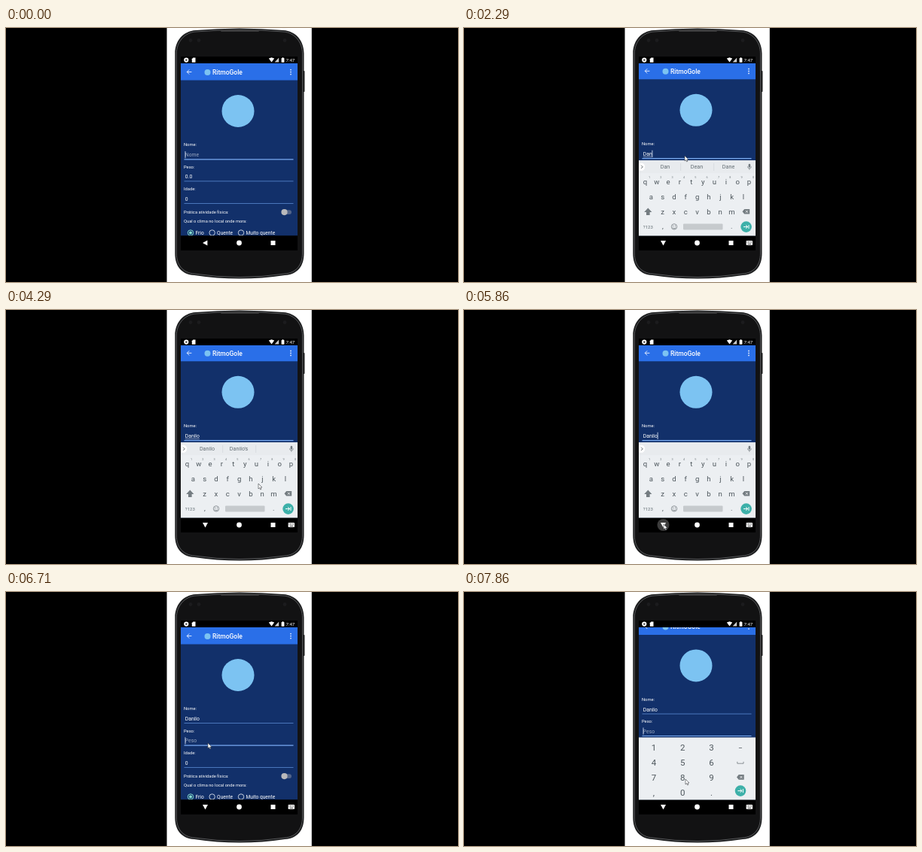
An HTML page with a canvas for the animation above (8 s loop, 600x338 px).

```html
<!DOCTYPE html>
<html lang="pt">
<head>
<meta charset="utf-8">
<title>Cadastro</title>
<style>
html, body { margin: 0; width: 100%; height: 100%; overflow: hidden; background: #000; }
canvas { display: block; width: 600px; height: 338px; }
</style>
</head>
<body>
<canvas id="stage"></canvas>
<script>
const LOOP = 8000, RATE = 7;
const dpr = window.devicePixelRatio || 1;

function setup(canvas) {
  canvas.width = Math.round(600 * dpr);
  canvas.height = Math.round(338 * dpr);
  return canvas.getContext('2d');
}

const stage = setup(document.getElementById('stage'));
const layer = setup(document.createElement('canvas'));
let ctx = stage;

const NAVY = '#12306a', BLUE = '#2a6fe8', SKY = '#7cc3f2', KEY = '#4d565c', TEAL = '#3db0a9';

// Each entry holds from its time until the next one.
const typed = [[0, ''], [1710, 'D'], [2000, 'Da'], [2290, 'Dan'], [2570, 'Dani'], [3000, 'Danil'], [3570, 'Danilo']];
const hints = [
  [0, ["I'm", 'I', 'we']], [1860, ['D', 'Do', 'Did']], [2140, ['Dan', 'Dean', 'Dane']],
  [2710, ['Dani', 'Danish', 'Dan']], [3710, ['Danilo', "Danilo's", '']], [5710, []]
];
const boards = [
  [0, null], [1430, ['abc', 5.5, 0.78]], [1570, ['abc', 0, 1]], [6000, ['abc', 5.5, 0.7]],
  [6140, null], [6860, ['num', 5.5, 0.78]], [7000, ['num', 0, 1]]
];
const pans = [[0, 0], [1430, -1.2], [6140, 0], [6860, -6], [7000, -12.6]];
const caretFlips = [140, 570, 1430, 1570, 4140, 4570, 5140, 5570, 6140, 6570, 7290, 7710];
const mousePath = [
  [1430, 293, 170], [4000, 293, 170], [4290, 335, 231], [4710, 325, 240], [5140, 288, 263],
  [5570, 265, 285], [6140, 265, 285], [6570, 268, 203], [6710, 268, 201], [7290, 268, 201], [7860, 294, 249]
];

const at = (list, t) => list.reduce((v, [time, val]) => t >= time ? val : v, list[0][1]);

function mouseAt(t) {
  if (t < mousePath[0][0]) return null;
  for (let i = 1; i < mousePath.length; i++) {
    const [t0, x0, y0] = mousePath[i - 1], [t1, x1, y1] = mousePath[i];
    if (t < t1) {
      const k = (t - t0) / (t1 - t0), e = k * k * (3 - 2 * k);
      return [x0 + (x1 - x0) * e, y0 + (y1 - y0) * e];
    }
  }
  return mousePath[mousePath.length - 1].slice(1);
}

function rect(x, y, w, h, color, r = 0) {
  ctx.fillStyle = color;
  ctx.beginPath();
  if (r) ctx.roundRect(x, y, w, h, r); else ctx.rect(x, y, w, h);
  ctx.fill();
}

function disc(x, y, r, color) {
  ctx.fillStyle = color;
  ctx.beginPath();
  ctx.arc(x, y, r, 0, Math.PI * 2);
  ctx.fill();
}

function ring(x, y, r, color, w) {
  ctx.strokeStyle = color;
  ctx.lineWidth = w;
  ctx.beginPath();
  ctx.arc(x, y, r, 0, Math.PI * 2);
  ctx.stroke();
}

function poly(points, color) {
  ctx.fillStyle = color;
  ctx.beginPath();
  points.forEach(([x, y]) => ctx.lineTo(x, y));
  ctx.closePath();
  ctx.fill();
}

function line(points, color, w) {
  ctx.strokeStyle = color;
  ctx.lineWidth = w;
  ctx.beginPath();
  points.forEach(([x, y], i) => i ? ctx.lineTo(x, y) : ctx.moveTo(x, y));
  ctx.stroke();
}

// y is the middle of the capital letters.
function text(s, x, y, size, color, align = 'left', weight = 400) {
  ctx.font = `${weight} ${size}px Roboto, sans-serif`;
  ctx.textAlign = align;
  ctx.fillStyle = color;
  ctx.fillText(s, x, y + size * 0.355);
  return ctx.measureText(s).width;
}

// Outline of the phone, moved inwards by d.
function bodyPath(d) {
  const l = 224.3 + d, r = 395.5 - d, top = 3 + d, low = 329 - d;
  ctx.beginPath();
  ctx.moveTo(l, 34);
  ctx.bezierCurveTo(l, 17 + d, 235 + d, top + 1, 252, top);
  ctx.quadraticCurveTo(310, top - 5, 368, top);
  ctx.bezierCurveTo(385 - d, top + 1, r, 17 + d, r, 34);
  ctx.lineTo(r, 300);
  ctx.bezierCurveTo(r, 317 - d, 387 - d, low - 1, 370, low);
  ctx.quadraticCurveTo(310, low + 9, 250, low);
  ctx.bezierCurveTo(233 + d, low - 1, l, 317 - d, l, 300);
  ctx.closePath();
}

function drawPhone() {
  rect(0, 0, 600, 338, '#000');
  rect(213.5, 0, 192.3, 338, '#fff');
  rect(394.5, 57, 2, 28, '#2a2a2b', 0.8);
  bodyPath(0);
  ctx.fillStyle = '#1d1e1f';
  ctx.fill();
  bodyPath(2);
  ctx.fillStyle = '#121213';
  ctx.fill();
  ctx.strokeStyle = '#5c5d5f';
  ctx.lineWidth = 0.9;
  ctx.stroke();
  rect(285, 2.5, 51, 2.5, '#3a3a3b', 1.2);
  [245, 256, 370].forEach(x => disc(x, 16.5, 2.4, '#1c1c1e'));
  rect(232, 38, 155, 258, '#000');
}

function drawStatus() {
  rect(232, 38, 155, 9, '#000');
  disc(239.3, 42.6, 3.1, '#fff');
  disc(239.3, 42.6, 1.2, '#333');
  poly([[248.3, 39.6], [251.5, 39.6], [251.5, 45.8], [246.8, 45.8], [246.8, 41.2]], '#fff');
  poly([[348.8, 40.4], [352.5, 39.3], [356.2, 40.4], [352.5, 45.6]], '#fff');
  poly([[362.2, 39.5], [362.2, 45.6], [356.6, 45.6]], '#ccc');
  rect(365.6, 40, 3.8, 5.8, '#fff', 0.5);
  rect(366.7, 39.2, 1.6, 1, '#fff');
  text('7:47', 371.4, 42.7, 6.2, '#fff');
}

function drawField(y, value, hint, focused, caret, composing) {
  const w = text(value || hint, 237.8, y, 6.8, value ? '#fff' : '#98a6bf');
  if (composing && value) rect(237.8, y + 3.4, w, 0.6, '#dfe6f2');
  if (focused && caret) rect(237.6 + (value ? w : 0), y - 4.8, 0.8, 9.2, '#e3edff');
  rect(236.5, y + 5.5, 145, focused ? 1.2 : 0.8, focused ? '#78aaf2' : '#5c8ed6');
}

function drawRadio(x, label, on) {
  const c = on ? '#84dccd' : '#c3cddd';
  ring(x, 272.5, 3.7, c, 1);
  if (on) disc(x, 272.5, 2, c);
  text(label, x + 6.5, 272.7, 6.6, '#fff');
}

function drawForm(t, caret) {
  const onWeight = t >= 6570;
  ctx.save();
  ctx.beginPath();
  ctx.rect(232, 47, 155, 229.5);
  ctx.clip();
  rect(232, 47, 155, 230, NAVY);
  ctx.translate(0, at(pans, t));

  rect(232, 40, 155, 29.5, BLUE);
  const white = '#f2f6ff';
  line([[246.4, 58.5], [240.4, 58.5]], white, 0.9);
  line([[243.2, 55.5], [240.2, 58.5], [243.2, 61.5]], white, 0.9);
  disc(267.5, 59, 4, SKY);
  text('RitmoGole', 274, 59, 8.5, '#fff', 'left', 500);
  [55.6, 58.6, 61.6].forEach(y => disc(378, y, 0.85, white));

  disc(308, 110.5, 21.5, SKY);

  const label = (s, y) => text(s, 236, y, 5.75, '#fff');
  label('Nome:', 155.3);
  drawField(168.8, at(typed, t), 'Nome', !onWeight, caret, t >= 1710 && t < 5710);
  label('Peso:', 184.9);
  drawField(198, onWeight ? '' : '0.0', 'Peso', onWeight, caret);
  label('Idade:', 214.4);
  drawField(227.5, '0', '', false, false);
  label('Prática atividade física:', 245.1);
  rect(367, 242.2, 12, 5.8, '#526489', 2.9);
  disc(369.5, 245.1, 4.1, '#b9b9bb');
  label('Qual o clima no local onde mora:', 257);
  drawRadio(245, 'Frio', true);
  drawRadio(273.6, 'Quente', false);
  drawRadio(312, 'Muito quente', false);
  ctx.restore();
}

function drawNav(t) {
  rect(232, 276.5, 155, 19.5, '#000');
  const open = t >= 1430 && t < 6140 || t >= 6710;
  if (t >= 5710 && t < 6140) disc(264.5, 286, t < 6000 ? 8 : 9, t < 6000 ? '#3c3c3c' : '#222');
  poly(open ? [[261, 283], [268, 283], [264.5, 289.4]] : [[267.4, 282.5], [267.4, 289.5], [261, 286]], '#fff');
  disc(309.5, 286, 3.4, '#fff');
  rect(351.5, 283, 6, 6, '#fff');
  if (!open) return;
  rect(374.6, 283, 8.4, 6, '#fff', 0.8);
  for (let r = 0; r < 2; r++)
    for (let c = 0; c < 5; c++) rect(375.6 + c * 1.4, 284 + r * 1.4, 0.7, 0.7, '#222');
  rect(376.6, 287, 4.4, 0.8, '#222');
}

function drawEnter(x, y) {
  disc(x, y, 7.3, TEAL);
  line([[x - 3.6, y], [x + 2, y]], '#fff', 1);
  line([[x - 0.4, y - 2.3], [x + 2, y], [x - 0.4, y + 2.3]], '#fff', 1);
  line([[x + 3.4, y - 2.5], [x + 3.4, y + 2.5]], '#fff', 1);
}

function drawErase(x, y) {
  poly([[x - 5, y], [x - 2.3, y - 3.3], [x + 4.7, y - 3.3], [x + 4.7, y + 3.3], [x - 2.3, y + 3.3]], '#747c81');
  line([[x - 0.6, y - 1.5], [x + 2.4, y + 1.5]], '#fff', 0.8);
  line([[x - 0.6, y + 1.5], [x + 2.4, y - 1.5]], '#fff', 0.8);
}

function drawLetters(words, started) {
  rect(232, 176.3, 155, 100.2, '#eceff2');
  rect(232, 176.3, 155, 17, '#e8ebee');
  if (started) disc(235, 184.8, 5.2, '#fff');
  line([[235.2, 182.8], [237.2, 184.8], [235.2, 186.8]], KEY, 0.9);
  words.forEach((w, i) => text(w, 267 + i * 42, 184.8, 7.2, '#626c72', 'center'));
  if (words.length) [287.5, 331.5].forEach(x => rect(x, 180, 0.6, 10, '#cdd1d5'));
  rect(377.6, 180.8, 2.6, 4.8, '#727b80', 1.3);
  ctx.strokeStyle = '#727b80';
  ctx.lineWidth = 0.7;
  ctx.beginPath();
  ctx.arc(378.9, 184.3, 2.5, 0, Math.PI);
  ctx.stroke();
  rect(378.5, 186.8, 0.8, 2, '#727b80');

  const row = (keys, x, y) => [...keys].forEach((k, i) => text(k, x + i * 15.33, y, 9.6, KEY, 'center'));
  row('qwertyuiop', 240.5, 204.5);
  [...'1234567890'].forEach((n, i) => text(n, 246 + i * 15.33, 199, 3.8, '#70797e', 'center'));
  row('asdfghjkl', 248.3, 224.5);
  row('zxcvbnm', 263.6, 244.5);
  poly([[244.3, 239.6], [249.4, 244.9], [246.6, 244.9], [246.6, 249], [242, 249], [242, 244.9], [239.2, 244.9]], '#747c81');
  drawErase(374.5, 244.3);
  text('?123', 237.8, 264.6, 6, '#626c72');
  text(',', 264, 264.3, 9, KEY, 'center');
  ring(279, 264.4, 3.7, '#747c81', 0.8);
  disc(277.6, 263.4, 0.6, '#747c81');
  disc(280.4, 263.4, 0.6, '#747c81');
  ctx.beginPath();
  ctx.arc(279, 264.8, 2, 0.2, Math.PI - 0.2);
  ctx.stroke();
  rect(291, 260.6, 52.5, 7.8, '#c6cacd', 1);
  text('.', 355.3, 264.3, 9, KEY, 'center');
  drawEnter(374.6, 264.6);
}

function drawDigits() {
  rect(232, 193.6, 155, 82.9, '#eceff2');
  ['123−', '456', '789', ',0.'].forEach((keys, r) =>
    [...keys].forEach((k, c) => text(k, 252 + c * 38.3, 207 + r * 20, c < 3 ? 11.5 : 10, KEY, 'center')));
  line([[362.8, 225.8], [362.8, 228.2], [371, 228.2], [371, 225.8]], '#747c81', 0.8);
  drawErase(367, 246.4);
  drawEnter(367, 264.6);
}

// The keyboard is painted on its own layer so that it fades as one piece.
function drawBoard(t) {
  const board = at(boards, t);
  if (!board) return;
  const [kind, dy, alpha] = board;
  ctx = layer;
  ctx.setTransform(dpr, 0, 0, dpr, 0, 0);
  ctx.clearRect(0, 0, 600, 338);
  ctx.save();
  ctx.beginPath();
  ctx.rect(232, 47, 155, 249);
  ctx.clip();
  ctx.translate(0, dy);
  if (kind === 'abc') drawLetters(at(hints, t), at(typed, t) !== ''); else drawDigits();
  ctx.restore();
  ctx = stage;
  ctx.globalAlpha = alpha;
  ctx.drawImage(layer.canvas, 0, 0, 600, 338);
  ctx.globalAlpha = 1;
}

function drawMouse(t) {
  const pos = mouseAt(t);
  if (!pos) return;
  ctx.save();
  ctx.translate(...pos);
  poly([[0, 0], [0, 7], [1.6, 5.6], [2.7, 8], [3.9, 7.4], [2.8, 5.2], [4.9, 5]], '#fff');
  ctx.strokeStyle = '#3a3d42';
  ctx.lineWidth = 0.6;
  ctx.stroke();
  ctx.restore();
}

function draw(t) {
  const caret = caretFlips.filter(f => f <= t).length % 2 === 0;
  ctx.setTransform(dpr, 0, 0, dpr, 0, 0);
  drawPhone();
  drawForm(t, caret);
  drawStatus();
  drawNav(t);
  drawBoard(t);
  drawMouse(t);
}

const snap = t => Math.round(Math.floor((t + 5) * RATE / 1000) * 100 / RATE) * 10 % LOOP;

const start = performance.now();
function tick() {
  draw(snap((performance.now() - start) % LOOP));
  requestAnimationFrame(tick);
}
tick();
</script>
</body>
</html>
```
